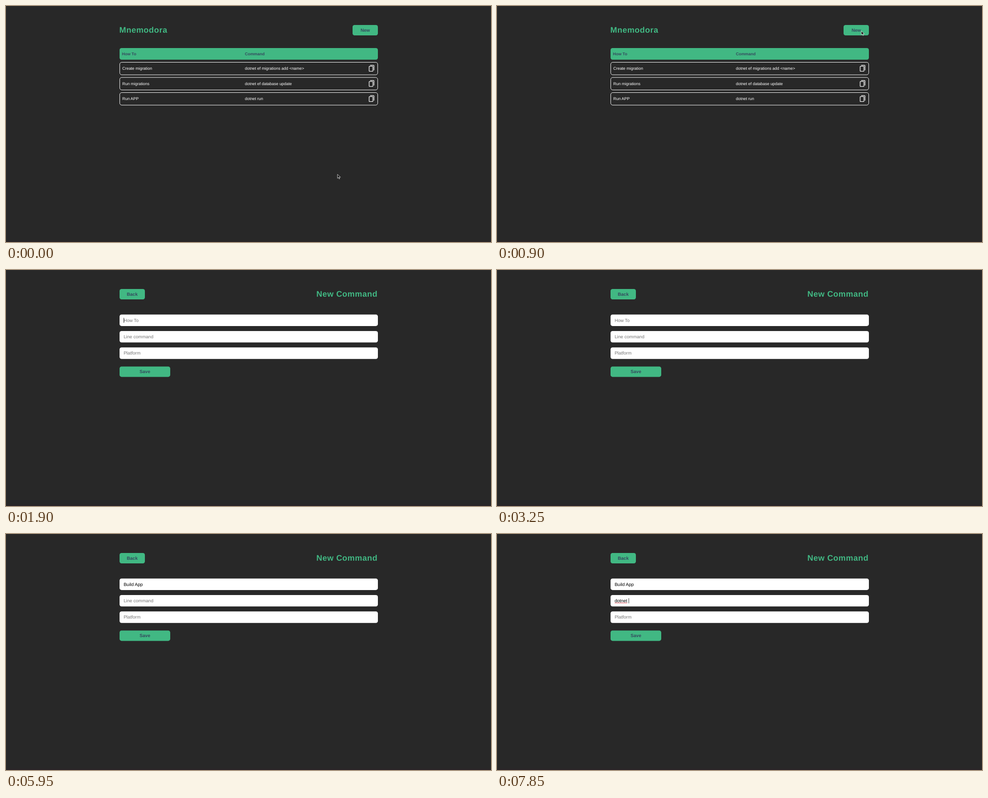
An HTML page for the animation above (8 s loop, 1072 by 522 pixels).

```html
<!DOCTYPE html>
<html lang="en">
<head>
<meta charset="utf-8">
<title>Command list</title>
<style>
html, body { margin: 0; width: 100%; height: 100%; overflow: hidden; background: #282828; }
svg { display: block; width: 1072px; height: 522px; }
text {
  font: 8.93px "Liberation Sans", Arial, sans-serif;
  white-space: pre; text-rendering: geometricPrecision; fill: #fff;
}
.title { font-size: 17.87px; font-weight: bold; letter-spacing: .558px; fill: #41b883; }
.button { font-size: 10.05px; font-weight: bold; text-anchor: middle; fill: #35495e; }
.head { font-weight: bold; fill: #35495e; }
.field { font-size: 10.05px; }
.green { fill: #41b883; }
.white { fill: #fff; }
.line { fill: none; stroke: #fff; }
</style>
</head>
<body>
<svg id="stage" viewBox="0 0 1072 522"></svg>
<script>
const LOOP = 8000, STEP = 50;
const OPEN_FORM = 950, CURSOR_GONE = 1600;
const FIELD_X = 259.9;

const label = (x, y, text, cls = '') =>
  `<text x="${x}" y="${y}" class="${cls}">${text}</text>`;
const box = (x, y, w, h, cls) =>
  `<rect x="${x}" y="${y}" width="${w}" height="${h}" rx="4.5" class="${cls}"/>`;
const button = (x, y, w, text) =>
  box(x, y, w, 23, 'green') + label(x + w / 2, y + 14.7, text, 'button');

const row = ([task, command], i) => `<g transform="translate(0 ${i * 33.5})">
  ${box(251.4, 124.5, 570.2, 27.7, 'line')}
  ${label(257, 141.3, task)}${label(528, 141.3, command)}
  <g class="line" stroke-width="1.3">
    <rect x="802.6" y="133.4" width="8.4" height="11" rx="1"/>
    <path d="M804.8 131.2h7.4q1.2 0 1.2 1.2v9.8"/>
  </g></g>`;

const fieldTop = i => 98.5 + i * 36.4;
const field = i => box(251, fieldTop(i), 571, 25.4, 'white') +
  label(FIELD_X, fieldTop(i) + 16, '', 'field');

const rows = [
  ['Create migration', 'dotnet ef migrations add &lt;name&gt;'],
  ['Run migrations', 'dotnet ef database update'],
  ['Run APP', 'dotnet run']
];

const stage = document.getElementById('stage');
stage.innerHTML = `
  <rect width="1072" height="522" fill="#282828"/>
  <rect y="519" width="1072" height="3" fill="#2a2427"/>
  <g id="list">
    ${label(250.5, 59.3, 'Mnemodora', 'title')}
    ${button(766, 42, 56, 'New')}
    ${box(251, 93, 571, 25.7, 'green')}
    ${label(256.3, 108.7, 'How To', 'head')}${label(528, 108.7, 'Command', 'head')}
    ${rows.map(row).join('')}
  </g>
  <g id="form">
    ${button(251, 42, 56, 'Back')}
    ${label(686, 59.3, 'New Command', 'title')}
    ${[0, 1, 2].map(field).join('')}
    ${button(251, 213.4, 112, 'Save')}
    <path id="misspelt" d="M260 152.6h28" stroke="#e8404a" stroke-width=".9"/>
    <rect id="caret" width=".8" height="11.2"/>
  </g>
  <path id="arrow" d="M0 0V16l4-4 2.5 6.5 2.5-1-2.5-6H12z" fill="#181818" stroke="#fff" stroke-width="1.3"/>
  <path id="beam" d="M-1.5-4.8h3M0-4.8v9.6M-1.5 4.8h3" class="line" stroke-width=".8"/>`;

const [list, form, misspelt, caret, arrow, beam] =
  ['list', 'form', 'misspelt', 'caret', 'arrow', 'beam'].map(id => document.getElementById(id));
const fieldTexts = [...form.querySelectorAll('.field')];

// One key time per typed character.
const inputs = [
  { hint: 'How To', text: 'Build App', keys: [3650, 3950, 4050, 4250, 4350, 4500, 4750, 5000, 5100] },
  { hint: 'Line command', text: 'dotnet ', keys: [7050, 7200, 7300, 7450, 7550, 7650, 7850] },
  { hint: 'Platform', text: '', keys: [] }
];
const caretSpans = [[1900, 2250, 0], [2750, 3250, 0], [3650, 5500, 0],
  [5500, 5950, 1], [6400, 6850, 1], [7050, LOOP, 1]];

const show = (node, on) => node.setAttribute('visibility', on ? 'visible' : 'hidden');
const ease = (t, from, to) => {
  const p = Math.min(1, Math.max(0, (t - from) / (to - from)));
  return p * p * (3 - 2 * p);
};
const curve = (p, a, b, c) => (1 - p) ** 2 * a + 2 * p * (1 - p) * b + p * p * c;

function pointer(t) {
  if (t < OPEN_FORM) {
    const p = ease(t, 0, 800);
    return [curve(p, 732.7, 1026, 805.2), curve(p, 372.3, 215, 55.2)];
  }
  const p = ease(t, 1200, 1550);
  return [806.4 - 470.9 * p, 55.4 + 69 * p];
}

function drawPointer(t) {
  const [x, y] = pointer(t);
  const onForm = t >= OPEN_FORM;
  const overTitle = onForm && x > 686 && y < 64;
  const overField = onForm && y > 98 && y < 124;
  const present = t < CURSOR_GONE && !overField;
  show(arrow, present && !overTitle);
  show(beam, present && overTitle);
  arrow.setAttribute('transform', `translate(${x} ${y}) scale(.558)`);
  beam.setAttribute('transform', `translate(${x} ${y})`);
}

function drawForm(t) {
  inputs.forEach(({ hint, text, keys }, i) => {
    const typed = text.slice(0, keys.filter(k => k <= t).length);
    fieldTexts[i].textContent = typed || hint;
    fieldTexts[i].style.fill = typed ? '#000' : '#757575';
  });
  const span = caretSpans.find(([from, to]) => t >= from && t < to);
  show(caret, span);
  if (span) {
    const i = span[2];
    const typing = inputs[i].keys[0] <= t;
    caret.setAttribute('x', FIELD_X + .2 + (typing ? fieldTexts[i].getComputedTextLength() : 0));
    caret.setAttribute('y', fieldTop(i) + 7.2);
  }
  show(misspelt, t >= 7850);
}

function render(now) {
  const t = Math.floor(now % LOOP / STEP) * STEP;
  const onForm = t >= OPEN_FORM;
  list.style.display = onForm ? 'none' : '';
  form.style.display = onForm ? '' : 'none';
  if (onForm) drawForm(t);
  drawPointer(t);
}

const start = performance.now();
function tick() {
  render(performance.now() - start);
  requestAnimationFrame(tick);
}
tick();
</script>
</body>
</html>
```
